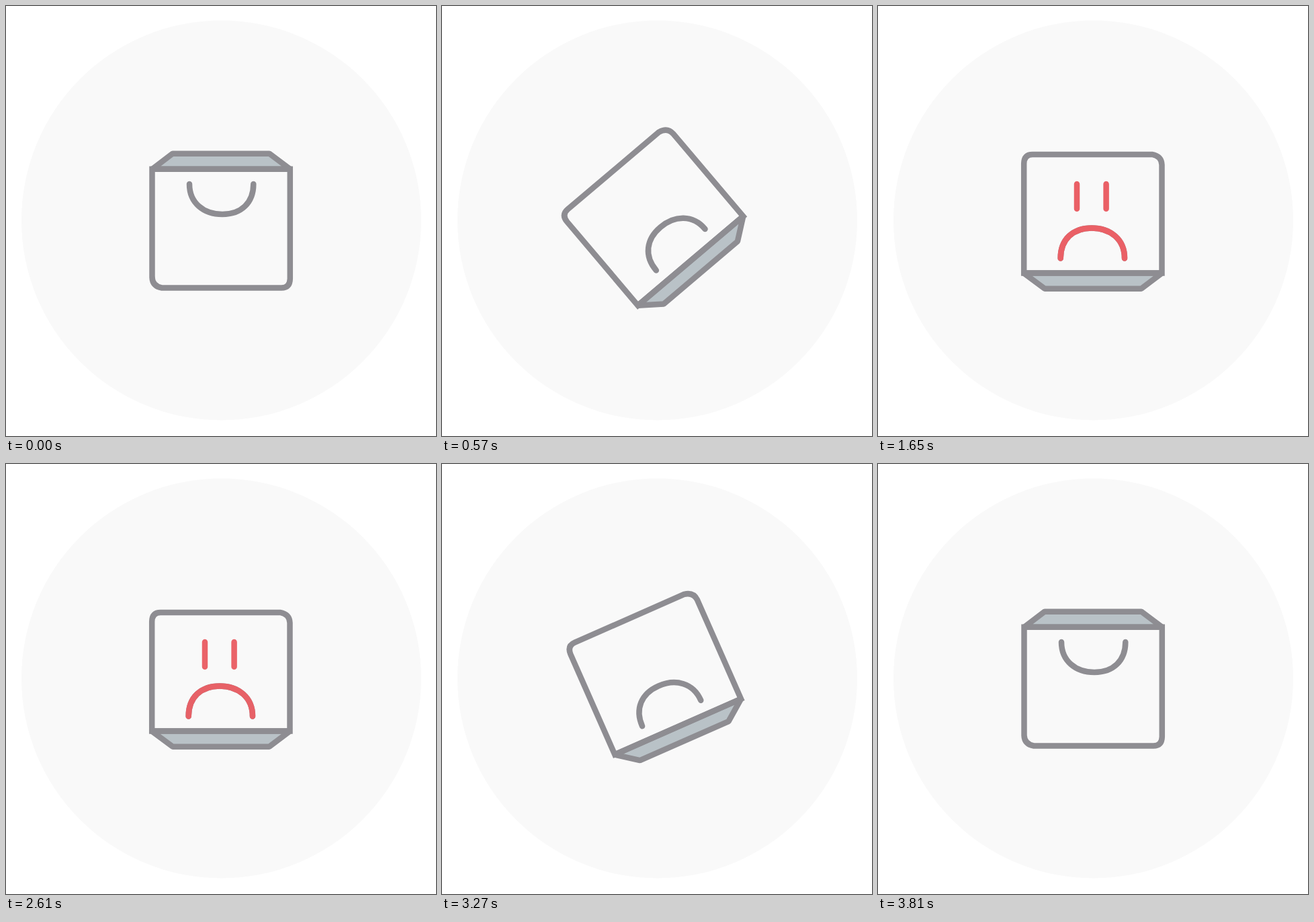
An HTML page that plays this animation: 640x640 px, repeating every 4.53 s.

```html
<!DOCTYPE html>
<html lang="en">
<head>
<meta charset="utf-8">
<style>
  html, body { margin: 0; width: 100%; height: 100%; overflow: hidden; background: #fff; }
  svg { display: block; width: 100%; height: 100%; }
  .line { fill: none; stroke: #8e8d92; stroke-width: 8.5; }
  .round { stroke-linecap: round; }
  .red { stroke: #ea6066; }
</style>
</head>
<body>
<svg viewBox="0 0 640 640">
  <circle cx="320.5" cy="319" r="297.5" fill="#f9f9f9"/>
  <g id="bag">
    <path class="line" style="fill:#b9c2c7" stroke-linejoin="bevel" d="M217.5 242.8 248 219.7H392L423 242.8Z"/>
    <path class="line" d="M217.5 242.8V404Q218 417 232 419.5H410Q422.5 419.5 422.8 406V242.8Z"/>
    <path id="mouth" class="line round" d="M273 265C273 293 294 310 322 310S368.3 293 368.3 265"/>
    <g id="face">
      <use href="#mouth" style="stroke:#ea6066"/>
      <path class="line round red" d="M344 375.4V338.6M300.4 375.4V338.6"/>
    </g>
  </g>
</svg>
<script>
  const LOOP = 4530;
  const TURN = 900;
  const bag = document.getElementById('bag');
  const face = document.getElementById('face');
  document.querySelector('use').remove();
  const mouth = document.getElementById('mouth').cloneNode();
  mouth.removeAttribute('id');
  mouth.classList.add('red');
  face.append(mouth);

  // Eased 0 to 1 between two times
  function ramp(time, start, end) {
    const p = Math.min(1, Math.max(0, (time - start) / (end - start)));
    return p * p * (3 - 2 * p);
  }

  // Half turn from 0 to 1: wind up backwards, swing past the end, settle
  function halfTurn(time, windEnd, swingEnd) {
    const windUp = 0.1, overshoot = 0.03;
    return -windUp * ramp(time, 0, windEnd)
      + (1 + windUp + overshoot) * ramp(time, windEnd, swingEnd)
      - overshoot * ramp(time, swingEnd, TURN);
  }

  function draw() {
    const time = performance.now() % LOOP;
    const turned = halfTurn(time, 155, 755) - halfTurn(time - 2910, 205, 740);
    bag.setAttribute('transform', `rotate(${180 * turned} 320 320.2)`);
    face.style.opacity = ramp(time, 1080, 1650) - ramp(time, 2580, 2910);
    requestAnimationFrame(draw);
  }
  draw();
</script>
</body>
</html>
```
